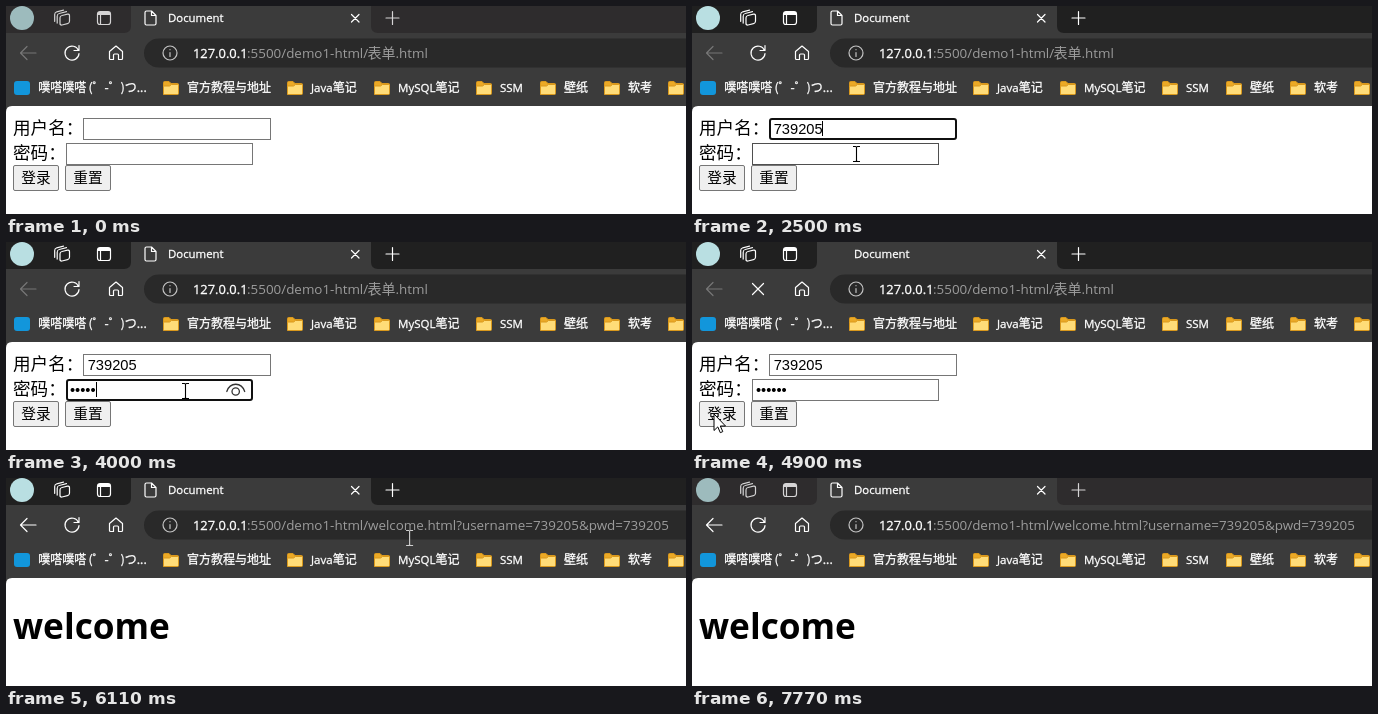
An HTML page that plays this animation: 680x208 px, repeating every 7810 ms.

```html
<!DOCTYPE html>
<html lang="zh-CN">
<head>
<meta charset="utf-8">
<title>Document</title>
<style>
html, body { margin: 0; width: 100%; height: 100%; overflow: hidden; background: #3b3b3b; }
svg { display: block; width: 680px; height: 208px; }
text { white-space: pre; }
.ui { font-family: "Open Sans", "Noto Sans", "Noto Sans CJK SC", sans-serif; font-size: 11.5px; fill: #fff; }
.cjk { font-family: "Noto Sans CJK SC", "Noto Sans CJK", sans-serif; }
.firm { stroke: #fff; stroke-width: .3; }
.title { font-size: 11.4px; }
.host { font-size: 12.9px; }
.url { font-size: 13.42px; fill: #9c9c9c; }
.mark { font-size: 12px; fill: #fff; }
.label { font-size: 17.6px; }
.btn { font-size: 14.67px; }
.input { font-family: "Liberation Sans", Arial, sans-serif; font-size: 14.67px; }
.heading { font-size: 35.2px; font-weight: 700; fill: #000; }
.line { fill: none; stroke: #fff; stroke-width: 1.2; stroke-linecap: round; stroke-linejoin: round; }
.info { stroke: #c4c4c4; }
</style>
</head>
<body>
<svg viewBox="0 0 680 208">
  <defs>
    <g id="folder" stroke="#d9981c" stroke-linejoin="round">
      <path d="M.5 14.5V2.5Q.5 1.500 1.500 1.500H6L8 3.500H14.500Q15.500 3.500 15.500 4.500V8Z" fill="#eba926"/>
      <path d="M.5 7Q.5 6 1.500 6H6.500L8.500 4.500H14.500Q15.500 4.500 15.500 5.500V13.500Q15.500 14.500 14.500 14.500H1.500Q.5 14.500 .5 13.500Z" fill="#ffdc78"/>
    </g>
  </defs>

  <rect width="680" height="208" fill="#3b3b3b"/>

  <!-- tab strip -->
  <g id="strip">
    <path d="M0 0H125V20Q125 27 118 27H0Z"/>
    <path d="M365 0H680V27H372Q365 27 365 20Z"/>
  </g>
  <g id="stripIcons">
    <circle cx="16" cy="12" r="12" fill="#b9dfe2"/>
    <g class="line">
      <g transform="translate(56 12) skewY(-14)">
        <rect x="-2" y="-2.500" width="9.500" height="9.500" rx="2"/>
        <path d="M-4.800 4V-3.200Q-4.800 -5.200 -2.800 -5.200H4.500M-7.300 1.500V-5.500Q-7.300 -7.500 -5.300 -7.500H1.500"/>
      </g>
      <rect x="91.500" y="5.500" width="13" height="13" rx="2.500"/>
      <path d="M92 7.500H104" style="stroke-width:3;stroke-linecap:butt"/>
      <path d="M94.500 8V18.500"/>
      <path d="M386.500 5.500V18.500M380 12H393"/>
    </g>
  </g>
  <path id="favicon" class="line" d="M139 6.500Q139 5 140.500 5H145.500L150 9.500V17.500Q150 19 148.500 19H140.500Q139 19 139 17.500ZM145.500 5V9.500H150"/>
  <text class="ui title firm" x="162" y="16.300">Document</text>
  <path class="line" d="M345.500 8.500L353 16M353 8.500L345.500 16"/>

  <!-- toolbar -->
  <path id="back" class="line" d="M30 47H14.500M21 40.500L14.500 47L21 53.500"/>
  <path id="reload" class="line" d="M72.500 44.500A7 7 0 1 0 73 47.500M73 39.500V44.500H68"/>
  <path id="stop" class="line" d="M60.500 41.500L71.500 52.500M71.500 41.500L60.500 52.500"/>
  <path class="line" d="M103.500 45.500L110 40L116.500 45.500V52.500Q116.500 53.500 115.500 53.500H112.500V49Q112.500 48 111.500 48H108.500Q107.500 48 107.500 49V53.500H104.500Q103.500 53.500 103.500 52.500Z"/>
  <rect x="138" y="32.500" width="600" height="29" rx="14.500" fill="#292929"/>
  <circle class="line info" cx="164" cy="47" r="7"/>
  <path class="line info" d="M164 46.500V50.500M164 43.600V43.700"/>
  <text class="ui host firm" x="187" y="51.500">127.0.0.1</text>
  <text class="ui url" x="241" y="51.500">:5500/demo1-html/</text>
  <g id="formUrl">
    <text class="cjk" x="361.500" y="51.800" font-size="14" fill="#9c9c9c">表单</text>
    <text class="ui url" x="389.500" y="51.500">.html</text>
  </g>
  <text id="welcomeUrl" class="ui url" x="362" y="51.500"></text>

  <!-- bookmarks -->
  <rect x="8" y="75" width="16" height="14" rx="3" fill="#1296db"/>
  <text class="cjk mark firm" x="32.300" y="86.300">噗嗒噗嗒</text>
  <text class="cjk mark firm" x="82.500" y="86.300">(゜-゜)つ...</text>
  <g id="marks"></g>

  <!-- page -->
  <path d="M0 208V106Q0 100 6 100H680V208Z" fill="#fff"/>
  <g id="form">
    <text class="cjk label" x="7" y="127.700">用户名：</text>
    <text class="cjk label" x="7" y="152.700">密码：</text>
    <rect id="userBox" fill="#fff"/>
    <rect id="pwdBox" fill="#fff"/>
    <text id="userText" class="input" x="81.700" y="128"></text>
    <text id="pwdText" class="input" x="63.900" y="153"></text>
    <rect id="caret" width="1" height="15"/>
    <g id="eye" fill="none" stroke="#333" stroke-width="1.300" stroke-linecap="round">
      <path d="M220.800 149.500C224 139.800 235.500 139.800 238.700 149.500"/>
      <circle cx="229.700" cy="149.500" r="3.700"/>
    </g>
    <rect id="loginBox" x="7.500" y="159.500" width="45" height="25" rx="1.500"/>
    <rect id="resetBox" x="59.500" y="159.500" width="45" height="25" rx="1.500"/>
    <text class="cjk btn" x="15.300" y="177.200">登录</text>
    <text class="cjk btn" x="67.300" y="177.200">重置</text>
  </g>
  <text id="heading" class="ui heading" x="7" y="161">welcome</text>

  <path id="beam" fill="none" stroke-width="1.100" d="M-3.500 -7.500H-1Q0 -7.500 0 -6.500V6.500Q0 7.500 -1 7.500H-3.500M3.500 -7.500H1Q0 -7.500 0 -6.500M0 6.500Q0 7.500 1 7.500H3.500"/>
  <path id="arrow" d="M0 0V16.500L3.800 12.900L6.300 18.700L8.800 17.600L6.300 12H11.500Z" fill="#fff" stroke="#000"/>
</svg>
<script>
const LOOP = 7810;
const USER = '739205';
const $ = id => document.getElementById(id);
const show = (id, on) => $(id).setAttribute('visibility', on ? 'inherit' : 'hidden');
const set = (id, attrs) => { for (const k in attrs) $(id).setAttribute(k, attrs[k]); };

const fields = {
  userBox: { x: 77, y: 112, w: 188, h: 22 },
  pwdBox: { x: 60, y: 137, w: 187, h: 22 }
};
const buttons = {
  loginBox: { x: 7, y: 159, w: 46, h: 26 },
  resetBox: { x: 59, y: 159, w: 46, h: 26 }
};
const pill = { x: 138, y: 33, w: 542, h: 28 };

const userKeys = [1140, 1300, 1500, 1880, 2150, 2340];
const pwdKeys = [3060, 3300, 3500, 3770, 4000, 4190];
const FOCUS_USER = 720, FOCUS_PWD = 2740, PRESS = 4670, RELEASE = 4750;
const LOADED = 5000, BLUR = 7770;

// pointer path: time, x, y
const path = [
  [120, 300, 204], [260, 262, 178], [400, 212, 148], [560, 182.5, 129],
  [1140, 182.5, 129], [1300, 184, 129], [1450, 184, 129], [1570, 186, 129],
  [2300, 186, 129], [2500, 164.5, 148], [2700, 164.5, 148], [3000, 179.5, 149],
  [4150, 179.5, 149], [4300, 96, 163], [4480, 22, 172], [5080, 22, 172],
  [5420, 130, 146], [5700, 300, 80], [5920, 448, 48], [6110, 403.5, 60],
  [6220, 415, 57], [6960, 636, 57], [7030, 636, 59], [7240, 628, 120], [7460, 604, 210]
];

function pointer(t) {
  const last = path.length - 1;
  if (t < path[0][0] || t >= path[last][0]) return null;
  const i = path.findIndex(p => p[0] > t) - 1;
  const [t0, x0, y0] = path[i], [t1, x1, y1] = path[i + 1];
  const k = (t - t0) / (t1 - t0);
  return { x: x0 + (x1 - x0) * k, y: y0 + (y1 - y0) * k };
}

const inside = (p, r) => !!p && p.x >= r.x && p.x < r.x + r.w && p.y >= r.y && p.y < r.y + r.h;
const typed = (keys, t) => keys.filter(k => k <= t).length;

function drawField(id, focused, hover) {
  const { x, y, w, h } = fields[id], sw = focused ? 2 : 1;
  set(id, {
    x: x + sw / 2, y: y + sw / 2, width: w - sw, height: h - sw, rx: focused ? 2 : 0,
    'stroke-width': sw, stroke: focused ? '#101010' : hover ? '#4f4f4f' : '#767676'
  });
}

function drawButton(id, hover, down) {
  set(id, {
    fill: down ? '#f5f5f5' : hover ? '#e5e5e5' : '#efefef',
    stroke: down ? '#8d8d8d' : hover ? '#4f4f4f' : '#767676'
  });
}

function drawPointer(p, loaded) {
  const onPill = inside(p, pill);
  const onField = !loaded && Object.values(fields).some(r => inside(p, r));
  const beam = onPill || onField;
  show('beam', p && beam);
  show('arrow', p && !beam);
  if (!p) return;
  set(beam ? 'beam' : 'arrow', { transform: `translate(${p.x} ${p.y})` });
  set('beam', { stroke: onPill ? '#d0d0d0' : '#000' });
}

function draw(t) {
  const active = t >= FOCUS_USER && t < BLUR;
  const loading = t >= RELEASE && t < LOADED + 80;
  const loaded = t >= LOADED;
  const p = pointer(t);

  set('strip', { fill: active ? '#202020' : '#2e2c2d' });
  set('stripIcons', { opacity: active ? 1 : 0.8 });
  show('favicon', !loading);
  show('reload', !loading);
  show('stop', loading);
  set('back', { opacity: loaded ? 1 : 0.3 });
  show('formUrl', !loaded);
  show('welcomeUrl', loaded);
  show('form', !loaded);
  show('heading', loaded);

  const onUser = t >= FOCUS_USER && t < FOCUS_PWD;
  const onPwd = t >= FOCUS_PWD && t < PRESS;
  const nUser = typed(userKeys, t), nPwd = typed(pwdKeys, t);
  drawField('userBox', onUser, inside(p, fields.userBox));
  drawField('pwdBox', onPwd, inside(p, fields.pwdBox));
  $('userText').textContent = USER.slice(0, nUser);
  $('pwdText').textContent = '•'.repeat(nPwd);
  show('caret', onUser || onPwd);
  set('caret', onUser
    ? { x: Math.round(81 + nUser * 8.16), y: 115 }
    : { x: Math.round(64 + nPwd * 5.13), y: 140 });
  show('eye', onPwd && nPwd > 0);
  for (const id in buttons) {
    const hover = t < RELEASE && inside(p, buttons[id]);
    drawButton(id, hover, hover && t >= PRESS);
  }

  drawPointer(p, loaded);
}

const marks = [
  [157, '官方教程与地址'], [281, 'Java笔记'], [368, 'MySQL笔记'],
  [470, 'SSM'], [534, '壁纸'], [598, '软考'], [662, '']
];
$('marks').innerHTML = marks.map(([x, name]) =>
  `<use href="#folder" x="${x}" y="74"/><text class="ui firm" x="${x + 24}" y="86.3">` +
  name.replace(/[\u4e00-\u9fff]+/, s => `<tspan class="cjk mark">${s}</tspan>`) +
  '</text>').join('');
$('welcomeUrl').textContent = `welcome.html?username=${USER}&pwd=${USER}`;

function tick() {
  draw(performance.now() % LOOP);
  requestAnimationFrame(tick);
}
tick();
</script>
</body>
</html>
```
